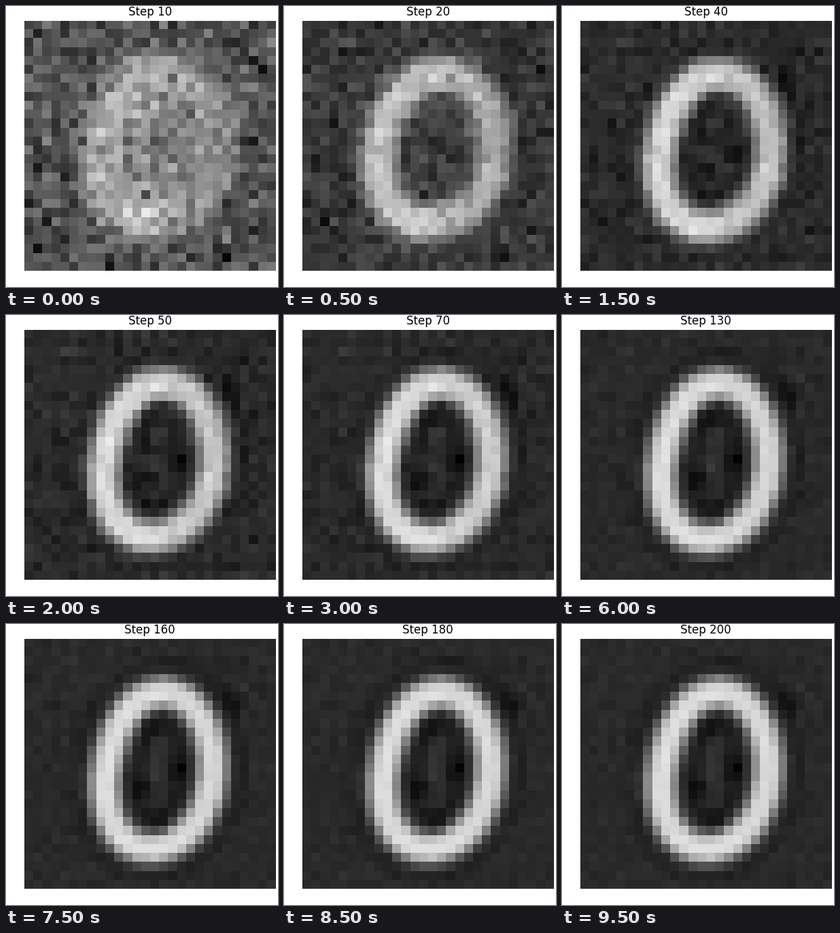
A matplotlib script that plays this animation: 400 px wide and 415 px high, repeating every 10 s.

```python
import numpy as np
import matplotlib.pyplot as plt
from matplotlib.animation import FuncAnimation

WIDTH, HEIGHT, DPI = 400, 415, 100
SIZE, FRAMES, INTERVAL = 28, 20, 500
LEFT, TOP, AXES_WIDTH, AXES_HEIGHT = 27, 22, 369.6, 369

# Centres of soft dark residue, in (column, row)
POCKETS = [(13.6, 9.4), (16.5, 14.2), (12.6, 16.3), (14.8, 20), (22.5, 6.7)]

cols, rows = np.meshgrid(np.arange(SIZE), np.arange(SIZE))
angles = np.linspace(0, 2 * np.pi, 160, endpoint=False)
right_side = np.clip((cols - 14) / 4, 0, 1)

# A running sum makes the noise calm down and settle
noise_sum = np.cumsum(
    np.random.default_rng(4).normal(size=(FRAMES, SIZE, SIZE)), axis=0)


def fade(step, span):
    """Falls from 1 at the first step towards 0."""
    return np.exp(-(step - 1) / span)


def blob(col, row, radius):
    return np.exp(-((cols - col) ** 2 + (rows - row) ** 2) / radius ** 2)


def oval(step):
    """Stroke distance and interior mask of the leaning, egg-shaped zero."""
    early = fade(step, 2.5)
    middle, half_height = 14.3 - 0.6 * early, 8.7 - 0.6 * early

    def axis(s):
        return 14.5 - 0.65 * s - 0.25 * s ** 2

    def half_width(s):
        return 5.9 + 0.8 * early + 0.35 * s + 0.3 * s ** 2

    s = np.sin(angles)
    x = axis(s) + half_width(s) * np.cos(angles)
    y = middle + half_height * s
    distance = np.hypot(cols[..., None] - x, rows[..., None] - y).min(axis=-1)

    s = np.clip((rows - middle) / half_height, -1, 1)
    inside = np.abs(cols - axis(s)) < half_width(s) * np.sqrt(1 - s ** 2)
    return distance, inside


def picture(frame):
    step = frame + 1
    distance, inside = oval(step)
    settled = 1 - fade(step, 3)

    ground = 42 + 40 * fade(step, 0.95)
    ground = ground + inside * (50 * fade(step, 0.58) - 5)
    ground -= 9 * settled * np.exp(-((distance - 3.3) / 0.8) ** 2)
    ground -= 22 * settled * sum(blob(c, r, 1.1) for c, r in POCKETS)
    ridge = np.exp(-((cols - 14.4) / 0.9) ** 2 - ((rows - 14.5) / 4) ** 4)
    ground += 18 * settled * ridge

    peak = 222 - 45 * fade(step, 1.5)
    peak = peak * (1 - 0.16 * fade(step, 8) * right_side)
    stroke_width = 1.75 + 0.55 * fade(step, 2.5)
    ink = np.exp(-(distance / stroke_width) ** 3)

    noise = 23 * noise_sum[frame] / step ** 1.2
    return np.clip(ground + (peak - ground) * ink + noise, 0, 255)


fig = plt.figure(figsize=(WIDTH / DPI, HEIGHT / DPI), dpi=DPI, facecolor="white")
ax = fig.add_axes([LEFT / WIDTH, 1 - (TOP + AXES_HEIGHT) / HEIGHT,
                   AXES_WIDTH / WIDTH, AXES_HEIGHT / HEIGHT])
ax.axis("off")
shown = ax.imshow(picture(0), cmap="gray", vmin=0, vmax=255,
                  interpolation="nearest", aspect="auto")
title = ax.set_title("Step 10", fontsize=12, family="DejaVu Sans")


def update(frame):
    shown.set_data(picture(frame))
    title.set_text(f"Step {10 * (frame + 1)}")
    return shown, title


animation = FuncAnimation(fig, update, frames=FRAMES, interval=INTERVAL,
                          repeat=True, repeat_delay=0, blit=False)
plt.show()
```
